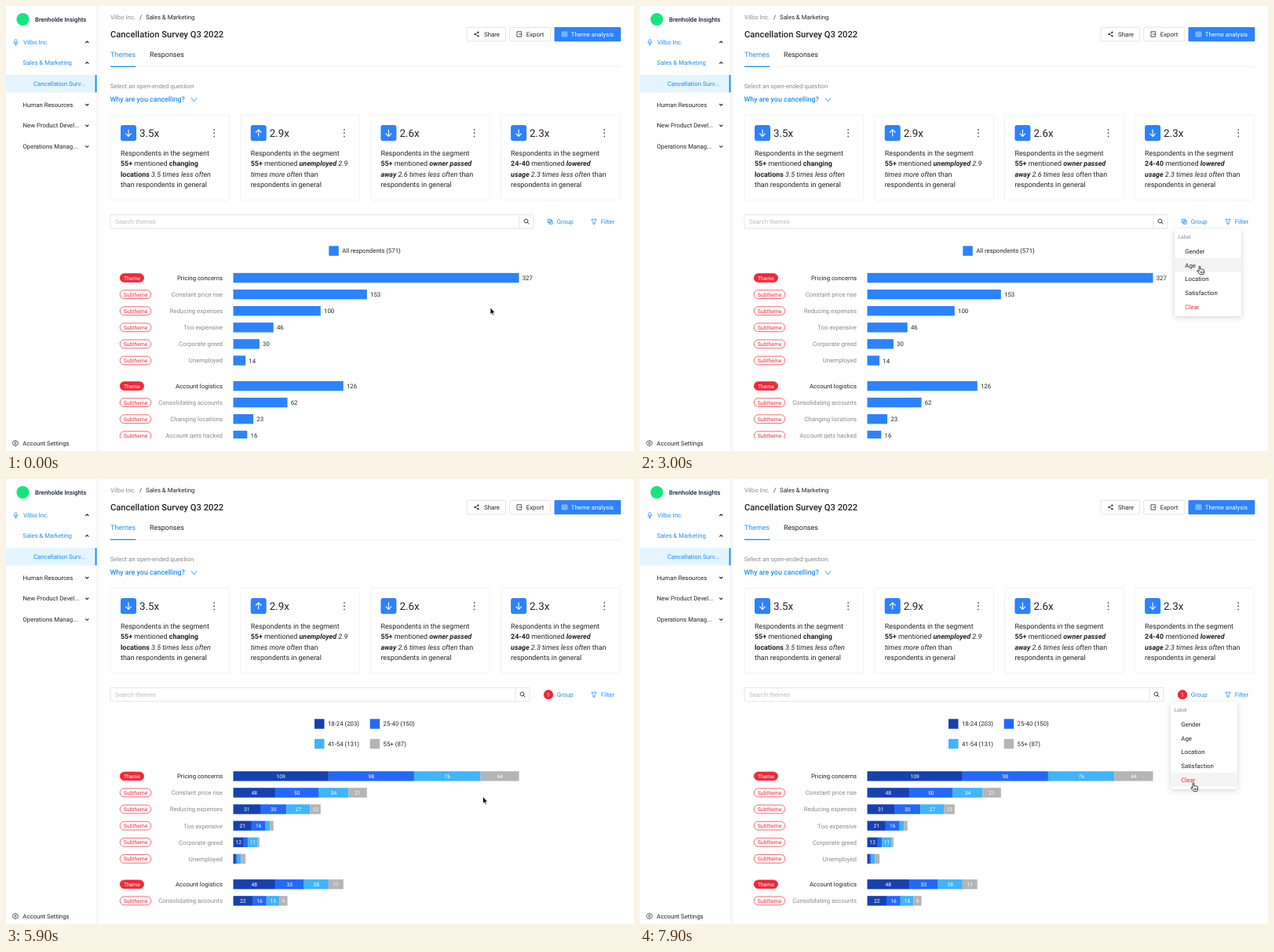
These frames come from a looping animation (800 by 568 pixels, 8 s). An HTML page:

```html
<!DOCTYPE html>
<html lang="en">
<head>
<meta charset="utf-8">
<title>Survey themes</title>
<style>
html, body { margin: 0; width: 100%; height: 100%; overflow: hidden; background: #fff; }
svg { display: block; font-family: Roboto, "Open Sans", sans-serif; text-rendering: geometricPrecision; }
.b { font-weight: 700; }
.i { font-style: italic; }
</style>
</head>
<body>
<svg id="stage" width="800" height="568" viewBox="0 0 800 568"></svg>
<script>
const BLUE = '#2d82fd', LINK = '#1b8df5', RED = '#f0283a', INK = '#232323', GRAY = '#8a8a8a';
const SHADES = ['#1641b0', '#2468fb', '#40b4fd', '#b5b4b6'];
const BAR_X = 289.5, UNIT = 364 / 327, PITCH = 21.1;

// Markup helpers. Text is placed by the middle of its capitals.
const text = (x, cy, str, fill = INK, size = 7.8, extra = '') =>
  `<text x="${x}" y="${cy + size * .355}" font-size="${size}" fill="${fill}" ${extra}>${str}</text>`;
const rect = (x, y, w, h, fill, extra = '') =>
  `<rect x="${x}" y="${y}" width="${w}" height="${h}" fill="${fill}" ${extra}/>`;
const box = (x, y, w, h, stroke = '#d9d9d9', r = 1) =>
  rect(x, y, w, h, '#fff', `stroke="${stroke}" stroke-width=".7" rx="${r}"`);
const line = (x, y, d, stroke = INK, w = .8) =>
  `<path transform="translate(${x} ${y})" d="${d}" fill="none" stroke="${stroke}" stroke-width="${w}"/>`;
const rich = str => str
  .replace(/\*(.+?)\*/g, '<tspan class="b">$1</tspan>')
  .replace(/~(.+?)~/g, '<tspan class="b i">$1</tspan>')
  .replace(/_(.+?)_/g, '<tspan class="i">$1</tspan>');
const MEDIUM = 'font-weight="500"', MID = 'text-anchor="middle"', END = 'text-anchor="end"';
const COG = 'M-1 -3.3H1L1.4 -2.2L2.6 -2.4L3.6 -.7L2.9 0L3.6 .7L2.6 2.4L1.4 2.2L1 3.3H-1L-1.4 2.2L-2.6 2.4L-3.6 .7L-2.9 0L-3.6 -.7L-2.6 -2.4L-1.4 -2.2ZM-1.1 0A1.1 1.1 0 1 0 1.1 0A1.1 1.1 0 1 0 -1.1 0';

function sidebar() {
  const item = (x, y, str, open, fill = INK) => text(x, y, str, fill) +
    line(103.3, y, open ? 'M-2 1L0 -1L2 1' : 'M-2 -1L0 1L2 -1', INK, 1.1);
  return rect(115.5, 0, 1, 568, '#ececec') + rect(116.5, 0, 2, 568, '#f9f9f9') +
    `<circle cx="21.4" cy="17" r="8" fill="#16e57e"/>` +
    text(37, 17, 'Brenholde Insights', '#15223b', 7.8, MEDIUM) +
    line(12.5, 46, 'M-1.3 -2.2A1.3 1.3 0 0 1 1.3 -2.2V0A1.3 1.3 0 0 1 -1.3 0ZM-2.6 -.4A2.6 2.6 0 0 0 2.6 -.4M0 2.2V3.7M-1.5 3.7H1.5', LINK, .7) +
    item(22, 46, 'Vilbo Inc.', true, LINK) +
    item(21.5, 72.6, 'Sales &amp; Marketing', true, LINK) +
    rect(0, 88, 115.5, 22.3, '#e4f5ff') + rect(113.6, 88, 1.9, 22.3, LINK) +
    text(35, 99.2, 'Cancellation Surv...', LINK) +
    item(21.5, 126, 'Human Resources') +
    item(21.5, 152.6, 'New Product Devel...') +
    item(21.5, 179.3, 'Operations Manag...') +
    line(12, 558, COG, INK, .7) + text(21.3, 558, 'Account Settings');
}

function header() {
  return text(133, 14.3, 'Vilbo Inc.', GRAY) + text(170, 14.3, '/') +
    text(178, 14.3, 'Sales &amp; Marketing') +
    text(133, 35.8, 'Cancellation Survey Q3 2022', INK, 11.2, MEDIUM) +
    box(587, 27.3, 49.5, 17.6) +
    line(599.5, 36, 'M2 -2.2L-2 0L2 2.2', INK, .7) +
    [[2, -2.3], [-2.2, 0], [2, 2.3]].map(([x, y]) => `<circle cx="${599.5 + x}" cy="${36 + y}" r="1.1" fill="${INK}"/>`).join('') +
    text(609, 36.1, 'Share') +
    box(641.7, 27.3, 52, 17.6) +
    line(654, 36, 'M2.5 -1.7V-3.2H-3V3.2H2.5V1.7M-.8 0H3.2M2 -1.2L3.3 0L2 1.2', INK, .8) +
    text(662.8, 36.1, 'Export') +
    rect(698.5, 27, 84.8, 18.2, BLUE, 'rx="1"') +
    line(711.5, 36, 'M-3.4 -3H3.4V3H-3.4ZM-3.4 -1H3.4M-3.4 1H3.4M-1.2 -3V3M1.2 -3V3', '#d5e6ff', .6) +
    text(719.8, 36.1, 'Theme analysis', '#fff') +
    text(133, 62.3, 'Themes', LINK, 8.93) + text(183, 62.3, 'Responses', INK, 8.93) +
    rect(133, 77.4, 650, .6, '#ececec') + rect(133, 76.7, 32.3, 1.3, LINK) +
    text(132.7, 101.8, 'Select an open-ended question', GRAY) +
    text(132.5, 119.3, 'Why are you cancelling?', LINK, 8.9, MEDIUM) +
    line(239.5, 119.6, 'M-3.5 -2.3L0 2.3L3.5 -2.3', LINK, .9);
}

const CARDS = [
  ['3.5x', ['*55+* mentioned *changing*', '*locations* _3.5 times less often_', 'than respondents in general']],
  ['2.9x', ['*55+* mentioned ~unemployed~ _2.9_', '_times more often_ than', 'respondents in general']],
  ['2.6x', ['*55+* mentioned ~owner passed~', '~away~ _2.6 times less often_ than', 'respondents in general']],
  ['2.3x', ['*24-40* mentioned ~lowered~', '~usage~ _2.3 times less often_ than', 'respondents in general']]
];
const card = ([ratio, lines], n) => {
  const x = 133 + n * 165.7, up = n === 1;
  return box(x, 139.3, 151.7, 108.6, '#ececec') +
    rect(x + 13, 152, 20, 20.2, BLUE, 'rx="3"') +
    line(x + 23, 162.1, up ? 'M0 4.5V-4.2M-3.7 -.6L0 -4.3L3.7 -.6' : 'M0 -4.5V4.2M-3.7 .6L0 4.3L3.7 .6', '#fff', 1.1) +
    text(x + 37, 162.3, ratio, INK, 13.4) +
    [-4.3, 0, 4.3].map(d => `<circle cx="${x + 132.2}" cy="${162.2 + d}" r=".85" fill="#444"/>`).join('') +
    ['Respondents in the segment', ...lines].map((s, k) =>
      text(x + 13, 187.8 + k * 13.4, rich(s), INK, 8.92)).join('');
};

function toolbar(grouped) {
  const right = grouped ? 667 : 672;
  return box(133, 266.4, right - 133, 17.5) + line(right - 18, 266.4, 'M0 0V17.5', '#d9d9d9', .7) +
    text(139, 275.2, 'Search themes', '#bdbdbd') +
    line(right - 9, 275, 'M1.2 1.2A2.4 2.4 0 1 0 -2.2 -2.2A2.4 2.4 0 1 0 1.2 1.2L3.4 3.4', INK, .9) +
    (grouped
      ? `<circle cx="691" cy="275.2" r="6.1" fill="${RED}"/>` + text(691, 275.3, '1', '#fff', 6.7, MID)
      : line(693.3, 275.2, 'M-3 -3H1.2V1.2H-3ZM-1.2 -1.2H3V3H-1.2Z', LINK, .8)) +
    text(701.7, 275.3, 'Group', LINK) +
    line(749, 275.2, 'M-3.2 -3H3.2L1.1 .4V3H-1.1V.4Z', LINK, .8) +
    text(757.7, 275.3, 'Filter', LINK);
}

const legend = (x, y, fill, str) => rect(x, y - 6.2, 12.5, 12.5, fill) + text(x + 16.9, y + .2, str);

// Name, total, counts per age band; an empty name leaves a gap between themes.
const ROWS = [
  ['Pricing concerns', 327, [109, 98, 76, 44]], ['Constant price rise', 153, [48, 50, 34, 21]],
  ['Reducing expenses', 100, [31, 30, 27, 12]], ['Too expensive', 46, [21, 16, 5, 4]],
  ['Corporate greed', 30, [12, 5, 11, 2]], ['Unemployed', 14, [3, 1, 5, 5]],
  [''],
  ['Account logistics', 126, [48, 33, 28, 17]], ['Consolidating accounts', 62, [22, 16, 15, 9]],
  ['Changing locations', 23, []], ['Account gets hacked', 16, []]
];

function chart(grouped) {
  let y = grouped ? 379.3 : 347, theme = true;
  return '<g clip-path="url(#fold)">' + ROWS.map(([name, total, parts]) => {
    if (!name) { y += 11.4; theme = true; return ''; }
    const w = theme ? 30.4 : 39.6;
    let out = rect(145.2, y - 5.4, w, 10.8, theme ? RED : '#fff', `rx="5.4" stroke="${RED}" stroke-width=".7"`) +
      text(145.2 + w / 2, y + .1, theme ? 'Theme' : 'Subtheme', theme ? '#fff' : RED, 6.8, MID) +
      text(276, y + .2, name, theme ? INK : GRAY, 7.8, END);
    if (grouped) {
      let x = BAR_X;
      parts.forEach((n, k) => {
        const len = n * UNIT;
        out += rect(x, y - 6.2, len, 12.4, SHADES[k]);
        if (n > 8) out += text(x + len / 2, y, n, '#fff', 6.7, MID);
        x += len;
      });
    } else {
      out += rect(BAR_X, y - 6.2, total * UNIT, 12.4, BLUE) + text(BAR_X + total * UNIT + 4.2, y + .3, total);
    }
    y += PITCH;
    theme = false;
    return out;
  }).join('') + '</g>';
}

const view = grouped => toolbar(grouped) + (grouped
  ? legend(393, 312.5, SHADES[0], '18-24 (203)') + legend(463.7, 312.5, SHADES[1], '25-40 (150)') +
    legend(393, 338, SHADES[2], '41-54 (131)') + legend(463.7, 338, SHADES[3], '55+ (87)')
  : legend(411.3, 312.5, BLUE, 'All respondents (571)')) + chart(grouped);

const ITEMS = ['Gender', 'Age', 'Location', 'Satisfaction', 'Clear'];
const ITEM_TOP = 304, ITEM_H = 17.75;
const menu = rect(0, 284.5, 85, 111, '#fff', 'rx="1" filter="url(#shadow)"') +
  `<rect id="hover" width="85" height="${ITEM_H}" fill="#f4f4f4"/>` +
  text(4.4, 295, 'Label', GRAY, 6.7) +
  ITEMS.map((s, k) => text(13.3, ITEM_TOP + (k + .5) * ITEM_H + .2, s, s === 'Clear' ? RED : INK)).join('');

const $ = id => document.getElementById(id);
$('stage').innerHTML = `<defs>
  <clipPath id="fold"><rect width="800" height="552"/></clipPath>
  <filter id="shadow" x="-20%" y="-20%" width="140%" height="140%"><feDropShadow dx="0" dy="2" stdDeviation="3.5" flood-opacity=".17"/></filter>
  </defs>` + sidebar() + header() + CARDS.map(card).join('') +
  `<g id="plain">${view(false)}</g><g id="grouped">${view(true)}</g><g id="menu">${menu}</g>
  <g id="cursor" stroke-linejoin="round">
    <path id="arrow" d="M0 0V8.7L1.9 6.9L3.2 9.9L4.6 9.3L3.3 6.4H6Z" fill="#000" stroke="#fff" stroke-width=".7"/>
    <path id="hand" d="M-.9 1Q-.9 0 0 0T.9 1V4Q1.5 3.4 2.4 4Q3.2 3.5 4 4.3Q5.6 4.1 5.6 5.6V8Q5.4 9.5 4.7 10.6H.2Q-1 8.9 -3.1 6.7Q-3.4 5.2 -2 5.7L-.9 6.6ZM1 6.8V8.8M2.5 6.8V8.8M4 6.8V8.8" fill="#fff" stroke="#111" stroke-width=".8"/>
  </g>`;

// Pointer stops: time, x, y.
const PATH = [
  [0, 617, 385], [1050, 699, 281], [2100, 699, 281], [2900, 713, 332], [4200, 713, 332],
  [5300, 607.5, 405.5], [6000, 607.5, 405.5], [6800, 697, 275], [7150, 697, 275], [7800, 705, 388]
];
const clamp = v => Math.max(0, Math.min(1, v));
const ease = v => v * v * (3 - 2 * v);

function pointer(t) {
  const k = PATH.findIndex(p => p[0] > t);
  if (k < 0) return PATH[PATH.length - 1].slice(1);
  const [t0, x0, y0] = PATH[k - 1], [t1, x1, y1] = PATH[k];
  const e = ease((t - t0) / (t1 - t0));
  return [x0 + (x1 - x0) * e, y0 + (y1 - y0) * e];
}

const show = (id, on) => $(id).setAttribute('visibility', on ? 'visible' : 'hidden');

function draw(now) {
  const t = Math.floor(now % 8000 / 100) * 100;
  const [x, y] = pointer(t), grouped = t >= 3800;
  const left = grouped ? 676 : 681;
  const open = grouped ? clamp((t - 6700) / 200) : clamp((t - 1200) / 200);
  const row = Math.floor((y - ITEM_TOP) / ITEM_H);
  const onItem = open > 0 && x > left && x < left + 85 && row >= 0 && row < ITEMS.length;
  const onGroup = x > 698 && x < 725 && y > 266 && y < 284;

  show('plain', !grouped);
  show('grouped', grouped);
  $('menu').setAttribute('opacity', open);
  const scale = .8 + .2 * open;
  $('menu').setAttribute('transform', `translate(${left} ${284.5 * (1 - scale)}) scale(1 ${scale})`);
  $('hover').setAttribute('y', ITEM_TOP + row * ITEM_H);
  show('hover', onItem);
  $('cursor').setAttribute('transform', `translate(${x} ${y})`);
  show('hand', onItem || onGroup);
  show('arrow', !(onItem || onGroup));
  requestAnimationFrame(loop);
}
const start = performance.now();
const loop = () => draw(performance.now() - start);
loop();
</script>
</body>
</html>
```
